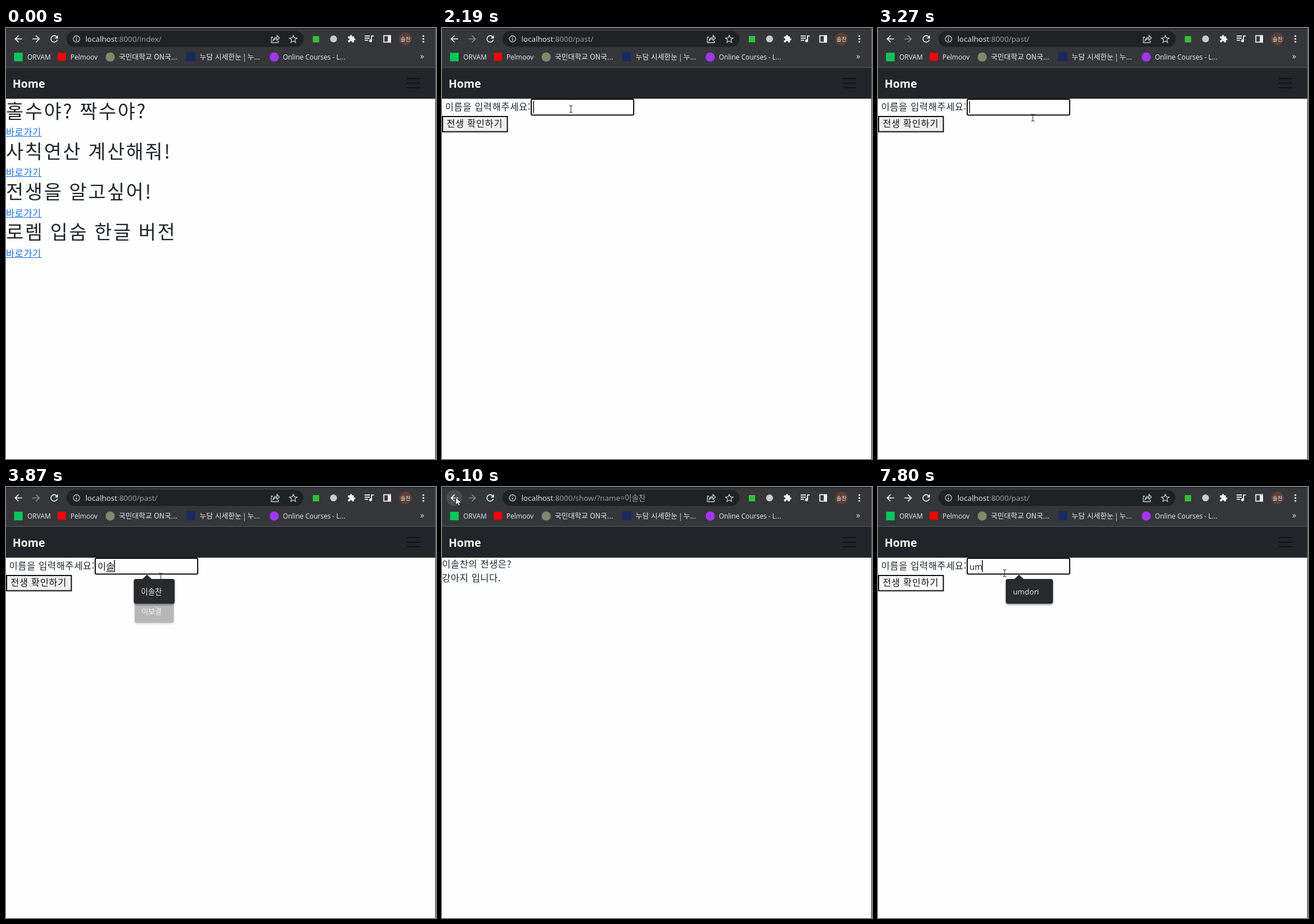
Recreate the animation shown at these times as an HTML page. Size 747x750 px, loop 8000 ms.

```html
<!DOCTYPE html>
<html lang="ko">
<head>
<meta charset="utf-8">
<title>Past life finder</title>
<style>
  html, body { margin: 0; width: 100%; height: 100%; overflow: hidden; background: #fefefe; }
  svg { display: block; }
  text { font: 16px "Noto Sans CJK KR", "Noto Sans CJK", sans-serif; white-space: pre; }
  .ui { font: 11.7px "Open Sans", "Noto Sans CJK KR", sans-serif; fill: #e8eaed; }
  .ko { font-size: 12.5px; fill: #e8eaed; }
  .url { font-size: 13.2px; }
  .dim { fill: #9aa0a6; }
  .body { font-weight: 350; letter-spacing: .65px; fill: #212529; }
  .head { font-size: 33px; font-weight: 350; letter-spacing: 2.6px; word-spacing: -1px; fill: #212529; }
  .link { fill: #0d6efd; }
  .popup { filter: drop-shadow(0 2px 1.5px rgba(0, 0, 0, .4)); }
  .popup text { font-size: 13.2px; }
  .line { fill: none; stroke: #c8cbd0; stroke-width: 1.3; }
</style>
</head>
<body>
<svg width="747" height="750" viewBox="0 0 747 750">
  <rect width="747" height="750" fill="#fefefe"/>

  <!-- browser toolbar -->
  <rect width="747" height="68" fill="#35363a"/>
  <rect width="747" height="1.5" fill="#202124"/>
  <rect y="68" width="747" height="1" fill="#5c5e62"/>
  <circle id="hover" cx="21.5" cy="19" r="14" fill="#4b4c50"/>
  <g fill="#f1f3f4">
    <path transform="translate(11.5 9.2) scale(.82)" d="M20 11H7.8l5.6-5.6L12 4l-8 8 8 8 1.4-1.4L7.8 13H20z"/>
    <path id="forward" transform="translate(62.3 9.2) scale(-.82 .82)" d="M20 11H7.8l5.6-5.6L12 4l-8 8 8 8 1.4-1.4L7.8 13H20z"/>
    <path transform="translate(74.2 9.4) scale(.8)" d="M17.65 6.35A7.96 7.96 0 0 0 12 4a8 8 0 1 0 7.73 10h-2.08A6 6 0 1 1 12 6c1.66 0 3.14.69 4.22 1.78L13 11h7V4z"/>
  </g>
  <rect x="105" y="5" width="412" height="28" rx="14" fill="#202124"/>
  <g class="line">
    <circle cx="122.5" cy="19" r="5.5"/>
    <path d="M122.5 18v4M122.5 15.5v1.4"/>
    <path d="M464 16h-3v9.5h12V22M464 22q1-6 7-6v-3l4 4.5-4 4v-3q-4-.2-7 3.5z"/>
    <path d="M499 12.8l1.9 4.3 4.7.4-3.6 3.1 1.1 4.6-4.1-2.4-4.1 2.4 1.1-4.6-3.6-3.1 4.7-.4z"/>
  </g>
  <text class="ui url" x="138" y="24">localhost<tspan id="path" class="dim"></tspan></text>
  <rect x="533" y="14" width="11" height="11" fill="#2fc42f"/>
  <circle cx="569" cy="19" r="6" fill="#c8ccd0"/>
  <g fill="#f1f3f4">
    <path transform="translate(592.8 11.4) scale(.62)" d="M20.5 11H19V7c0-1.1-.9-2-2-2h-4V3.5a2.5 2.5 0 0 0-5 0V5H4c-1.1 0-2 .9-2 2v3.8h1.5a2.7 2.7 0 0 1 0 5.4H2V20c0 1.1.9 2 2 2h3.8v-1.5a2.7 2.7 0 0 1 5.4 0V22H17c1.1 0 2-.9 2-2v-4h1.5a2.5 2.5 0 0 0 0-5z"/>
    <path d="M623 13h9v1.7h-9zM623 16.8h9v1.7h-9zM623 20.6h6v1.7h-6zM634 13h5v1.8h-3.2v7.5a2.5 2.5 0 1 1-1.8-2.4z"/>
    <path d="M655.5 12.5h13.5v13h-13.5zm1.8 1.8v9.4h6v-9.4z" fill-rule="evenodd"/>
    <circle cx="725" cy="14" r="1.6"/><circle cx="725" cy="19" r="1.6"/><circle cx="725" cy="24" r="1.6"/>
  </g>
  <circle cx="694" cy="19" r="11" fill="#5d4037"/>
  <text class="ko" x="694" y="22.5" text-anchor="middle" style="font-size:9.5px">솔찬</text>

  <!-- bookmarks -->
  <rect x="14" y="43" width="15" height="15" fill="#03c75a"/>
  <rect x="90" y="43" width="14" height="14" fill="#f00"/>
  <circle cx="181" cy="50.5" r="8" fill="#7d8a6a"/>
  <rect x="313" y="42" width="16" height="16" fill="#1b2a5e"/>
  <circle cx="466" cy="50.5" r="8" fill="#a435f0"/>
  <text class="ui" x="37" y="54.5">ORVAM</text>
  <text class="ui" x="112" y="54.5">Pelmoov</text>
  <text class="ko" x="196" y="54.5">국민대학교 ON국...</text>
  <text class="ko" x="336.5" y="54.5">누담 시세한눈 | 누...</text>
  <text class="ui" x="481" y="54.5">Online Courses - L...</text>
  <text class="ui" x="719.5" y="54" style="font-size:14px">»</text>

  <!-- site header -->
  <rect y="69" width="747" height="54" fill="#212529"/>
  <text class="ui" x="11.5" y="103.5" style="font-size:19px;font-weight:700;fill:#fff">Home</text>
  <path d="M696 88h23.5M696 96h23.5M696 104h23.5" stroke="#111417" stroke-width="2"/>

  <g id="index"></g>

  <g id="past">
    <text class="body" x="5.5" y="143">이름을 입력해주세요:</text>
    <rect id="field" x="155" y="124" width="178" height="27.5" rx="2" fill="#fff"/>
    <text id="typed" x="159" y="144" fill="#111"></text>
    <path id="composing" stroke="#111"/>
    <rect id="caret" y="127" width="1.4" height="21" fill="#000"/>
    <rect id="button" x="1" y="154" width="112.5" height="26.5" stroke="#111" stroke-width="2"/>
    <text class="body" x="8" y="172" style="fill:#111">전생 확인하기</text>
  </g>

  <g id="show">
    <text class="body" x="0" y="140">이솔찬의 전생은?</text>
    <text class="body" x="0" y="163.5">강아지 입니다.</text>
  </g>

  <g id="popups"></g>

  <g id="status">
    <path d="M0 732h114q4 0 4 4v14H0z" fill="#35363a"/>
    <text class="ui" x="3" y="746.5" style="font-size:11.4px;fill:#bdc1c6">localhost:8000/past/</text>
  </g>
  <rect x="745.5" width="1.5" height="750" fill="#5b5c60"/>

  <g id="cursor">
    <path id="arrow" transform="scale(.82)" d="M0 0V16l3.7-3.5 2.5 5.7 2.6-1.1-2.5-5.6h5.2z" fill="#fff" stroke="#111"/>
    <path id="hand" d="M-1.6 1.5a1.5 1.5 0 0 1 3 0V7l5 1.2q1.6.5 1.6 2.3v3l-1.6 5h-6l-4.2-6.3q-1-2 .9-2.2l1.3 1.3z" fill="#fff" stroke="#111"/>
    <path id="beam" d="M-3-6h2l1 1 1-1h2M0-5V5M-3 6h2l1-1 1 1h2" fill="none" stroke="#222"/>
  </g>
</svg>

<script>
const LOOP = 8000;
const $ = id => document.getElementById(id);
const clamp = v => Math.max(0, Math.min(1, v));
const show = (id, on) => $(id).style.display = on ? '' : 'none';

const headings = ['홀수야? 짝수야?', '사칙연산 계산해줘!', '전생을 알고싶어!', '로렘 입숨 한글 버전'];
$('index').innerHTML = headings.map((title, i) => {
  const y = 70.3 * i;
  return `<text class="head" x="0" y="${156.5 + y}">${title}</text>
    <text class="body link" x="0" y="${187 + y}">바로가기</text>
    <rect y="${Math.round(188 + y)}" width="62" height="1" fill="#0d6efd"/>`;
}).join('');

const pages = [[0, 'index'], [1490, 'past'], [4620, 'show'], [6350, 'past']];
const paths = { index: ':8000/index/', past: ':8000/past/', show: ':8000/show/?name=이솔찬' };

const typing = [
  [0, ''], [2770, 'd'], [3270, ''], [3570, 'ㅇ'], [3670, '이'], [3770, '이ㅅ'], [3870, '이솔'],
  [3960, '이솔ㅊ'], [4060, '이솔차'], [4160, '이솔찬'], [7200, '이솔'], [7300, '이'],
  [7400, ''], [7600, 'u'], [7700, 'um']
];

// time, x, y of the pointer
const moves = [
  [190, 602, 6], [790, 38, 325], [1490, 38, 325], [1990, 224, 141], [2200, 224, 141],
  [2400, 269, 156], [5500, 269, 156], [6000, 24, 18], [6400, 24, 18], [6700, 220, 150], [LOOP, 220, 150]
];

// fade-in start and end, fade-out start and end, width, entries
const popups = [
  [2290, 2480, 2850, 3070, 82, ['이솔찬', '이보결', 'umdori', '토마토', '123', '정기보험']],
  [3640, 3740, 3790, 3910, 71, ['이솔찬', '이보결']],
  [3780, 3860, 4060, 4220, 71, ['이솔찬']],
  [7300, 7390, 7420, 7560, 71, ['이솔찬', '이보결']],
  [7590, 7690, 8100, 8200, 82, ['umdori']]
];
$('popups').innerHTML = popups.map(([, , , , width, items]) =>
  `<g class="popup"><path d="M236 161l9-8.5 9 8.5z" fill="#292a2d"/>
  <rect x="222" y="160" width="${width}" height="${8 + 35 * items.length}" rx="4" fill="#292a2d"/>` +
  items.map((item, i) => `<text class="ui" x="234.5" y="${187 + 35 * i}">${item}</text>`).join('') + '</g>'
).join('');

const latest = (list, t) => list.filter(([start]) => start <= t).pop()[1];

function pointerAt(t) {
  const i = Math.max(1, moves.findIndex(([time]) => time > t));
  const [t0, x0, y0] = moves[i - 1], [t1, x1, y1] = moves[i];
  const p = clamp((t - t0) / (t1 - t0)), k = p * p * (3 - 2 * p);
  return [x0 + (x1 - x0) * k, y0 + (y1 - y0) * k];
}

function drawPointer(t, page) {
  const [x, y] = pointerAt(Math.floor((t + 10) / 100) * 100);
  const onLink = page === 'index' && x < 62 && y > 312;
  const onField = page === 'past' && x > 155 && x < 333 && y > 123 && y < 160;
  show('cursor', t >= 190);
  show('hand', onLink);
  show('beam', onField);
  show('arrow', !onLink && !onField);
  show('hover', t > 1000 && x < 36 && y < 33);
  $('cursor').setAttribute('transform', `translate(${x} ${y})`);
}

function drawField(t) {
  const value = latest(typing, t), hangul = /[ㄱ-힣]/.test(value);
  const focused = t >= 2090 && t < 4620 || t >= 6650;
  const typed = $('typed');
  typed.textContent = value;
  typed.style.font = hangul ? '350 16px "Noto Sans CJK KR", "Noto Sans CJK", sans-serif' : '14.5px "Open Sans", sans-serif';
  const end = 159 + (value ? typed.getComputedTextLength() : 0);
  show('caret', focused);
  $('caret').setAttribute('x', end - .7);
  show('composing', focused && hangul && t < 4600);
  $('composing').setAttribute('d', `M${end - 14.7} 147.5H${end}`);
  $('field').setAttribute('stroke', focused ? '#101010' : '#767676');
  $('field').setAttribute('stroke-width', focused ? 2 : 1);
  $('button').setAttribute('fill', t < 5000 ? '#efefef' : '#fcfcfc');
}

function drawPopups(t) {
  popups.forEach(([in0, in1, out0, out1, width, items], i) => {
    const alpha = Math.min(clamp((t - in0) / (in1 - in0)), clamp((out1 - t) / (out1 - out0)));
    const cx = 222 + width / 2, cy = 164 + 17.5 * items.length;
    const g = $('popups').children[i];
    g.style.display = alpha ? '' : 'none';
    g.style.opacity = alpha;
    g.setAttribute('transform', `translate(${cx} ${cy}) scale(${.94 + .06 * alpha}) translate(${-cx} ${-cy})`);
  });
}

function draw(t) {
  const page = latest(pages, t);
  for (const id of ['index', 'past', 'show']) show(id, id === page);
  $('path').textContent = paths[page];
  $('forward').setAttribute('fill', t >= 1490 && t < 6350 ? '#85878b' : '#f1f3f4');
  show('status', t >= 990 && t < 1490);
  $('status').style.opacity = clamp((t - 940) / 150);
  drawField(t);
  drawPopups(t);
  drawPointer(t, page);
}

const start = performance.now();
function tick() {
  draw((performance.now() - start) % LOOP);
  requestAnimationFrame(tick);
}
tick();
</script>
</body>
</html>
```
